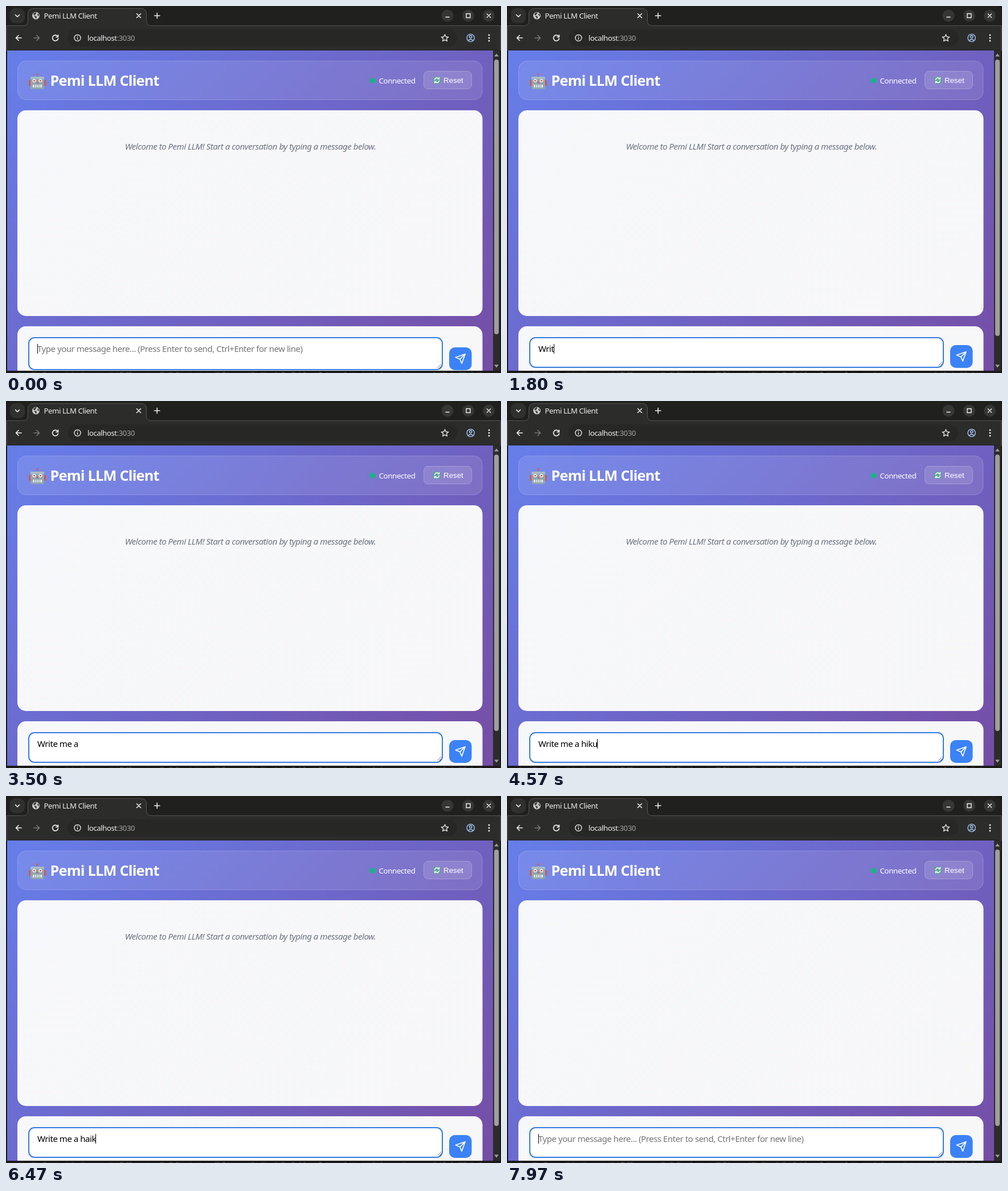
Animation of 869x644 px, one loop 8000 ms. Source, as an HTML page:

```html
<!DOCTYPE html>
<html lang="en">
<head>
<meta charset="utf-8">
<title>Pemi LLM Client</title>
<style>
html, body { margin: 0; width: 100%; height: 100%; overflow: hidden; background: #1b1a19; }
svg { display: block; width: 869px; height: 644px; }
text { font-family: "Noto Sans", "Open Sans", sans-serif; font-size: 15px; letter-spacing: -.031em; white-space: pre; }
.line { fill: none; stroke-linecap: round; stroke-linejoin: round; }
</style>
</head>
<body>
<svg viewBox="0 0 869 644" xmlns="http://www.w3.org/2000/svg">
  <defs>
    <linearGradient id="bg" gradientUnits="userSpaceOnUse" x1="59" y1="21" x2="797" y2="758">
      <stop offset="0" stop-color="#667eea"/><stop offset="1" stop-color="#764ba2"/>
    </linearGradient>
    <linearGradient id="card" gradientUnits="userSpaceOnUse" x1="59" y1="21" x2="797" y2="758">
      <stop offset="0" stop-color="#f7f8fb"/><stop offset="1" stop-color="#f7f7f8"/>
    </linearGradient>
    <clipPath id="page"><rect x="2" y="77" width="865" height="563"/></clipPath>
  </defs>
  <rect width="869" height="644" fill="#1b1a19"/>
  <g id="specks"></g>

  <!-- tab strip -->
  <path d="M1 78V10Q1 0 11 0H858Q868 0 868 10V78Z" fill="#20201f"/>
  <rect x="7" y="4" width="26" height="26" rx="9" fill="#30302f"/>
  <path class="line" d="M16.500 15.500l3.500 3.500 3.500-3.500" stroke="#eee" stroke-width="1.700"/>
  <path d="M1 34.500H30Q38.500 34.500 38.500 26V14Q38.500 4.500 48 4.500H237Q246.500 4.500 246.500 14V26Q246.500 34.500 255 34.500H868V78H1Z" fill="#2c2c2b" stroke="#555553"/>
  <circle cx="52.500" cy="17" r="6.500" fill="#c9c9c9"/>
  <path d="M48 14q2-3 5-3 1 2-1 3 0 2-3 2zm1 3q4 0 5 2 0 3-2 3-1-3-3-5zm7-4q2 1 2 5-3-1-3-3z" fill="#3a3a39"/>
  <text x="66.500" y="21.500" fill="#eee" style="font-size:13.200px">Pemi LLM Client</text>
  <g class="line" stroke="#eee" stroke-width="1.600">
    <path d="M229.500 13.500l7 7m0-7l-7 7M260.500 17h9.500m-4.750-4.750v9.500"/>
  </g>
  <g fill="#363635"><circle cx="775" cy="17" r="10.500"/><circle cx="811.500" cy="17" r="10.500"/><circle cx="847.500" cy="17" r="10.500"/></g>
  <path d="M771.500 19.500h7M808 13.500h7v7h-7zM844 13.500l7 7m0-7l-7 7" fill="none" stroke="#f2f2f2" stroke-width="1.400"/>

  <!-- toolbar -->
  <rect x="108" y="41" width="684" height="30" rx="15" fill="#272726"/>
  <g class="line" stroke-width="1.700" stroke="#eee">
    <path d="M27 56H17.500m4.500-4.500L17.500 56l4.500 4.500"/>
    <path d="M49 56h9.500m-4.500-4.500l4.500 4.500-4.500 4.500" stroke="#777"/>
    <path d="M90.500 53A5 5 0 1 0 91.500 57M91.500 51v3.500H88"/>
  </g>
  <g fill="none" stroke="#e3e3e3" stroke-width="1.400">
    <circle cx="125.500" cy="56" r="5.500"/><path d="M125.500 55v4m0-6.500v1.500"/>
    <path stroke-linejoin="round" d="M770.500 50l1.800 4 4.400.4-3.300 2.900 1 4.300-3.900-2.300-3.900 2.300 1-4.300-3.300-2.900 4.400-.4z"/>
  </g>
  <text x="143" y="60.500" fill="#f1f1f1" style="font-size:13.100px">localhost<tspan fill="#a5a5a5">:3030</tspan></text>
  <g fill="none" stroke="#a8c7fa" stroke-width="1.400">
    <circle cx="815.700" cy="56" r="6.600"/><circle cx="815.700" cy="54" r="2.200"/><path d="M811.500 60.500q4.200-4 8.400 0"/>
  </g>
  <g fill="#eee"><circle cx="848" cy="51" r="1.500"/><circle cx="848" cy="56" r="1.500"/><circle cx="848" cy="61" r="1.500"/></g>

  <g clip-path="url(#page)">
    <rect x="2" y="78" width="853" height="562" fill="url(#bg)"/>
    <path d="M1 77.500H868" stroke="#222221"/>

    <!-- header -->
    <rect x="20.500" y="96.500" width="815.500" height="68" rx="14.500" fill="#fff" fill-opacity=".1" stroke="#fff" stroke-opacity=".2"/>
    <g>
      <path d="M55 120v5" stroke="#78909c" stroke-width="1.500"/>
      <circle cx="55" cy="120" r="1.700" fill="#e5533c"/>
      <path d="M40.500 130h3v10h-3zm26 0h3v10h-3z" fill="#d9503f"/>
      <path d="M43 126q0-2 2-2h20q2 0 2 2v17q0 3-3 3H46q-3 0-3-3z" fill="#8fa5b0"/>
      <path d="M43 126q0-2 2-2h20q2 0 2 2v2H43z" fill="#a9bbc4"/>
      <circle cx="49.500" cy="131" r="3" fill="#f4f4f4"/><circle cx="60.500" cy="131" r="3" fill="#f4f4f4"/>
      <circle cx="49.500" cy="131" r="1.500" fill="#d9503f"/><circle cx="60.500" cy="131" r="1.500" fill="#d9503f"/>
      <path d="M55 132l2 3.500h-4z" fill="#d9503f"/>
      <rect x="47" y="138" width="16" height="5" rx="1.500" fill="#eceff1"/>
      <path d="M50.500 138v5m3-5v5m3-5v5m3-5v5" stroke="#607d8b"/>
    </g>
    <text x="77.500" y="139.500" fill="#fff" style="font-size:25.300px;font-weight:700">Pemi LLM Client</text>
    <circle cx="643.500" cy="131" r="4.700" fill="#10b981"/>
    <text x="654.500" y="135.500" fill="#fff" style="font-size:13.400px">Connected</text>
    <rect x="733.500" y="114.500" width="84" height="31" rx="7.500" fill="#fff" fill-opacity=".12" stroke="#fff" stroke-opacity=".25"/>
    <rect x="750" y="124" width="13" height="12.500" rx="2" fill="#62a39c"/>
    <path class="line" d="M752.500 129.500q1-3.500 4-3.500 2 0 3.500 1.500m.5-2v2.500h-2.500M760.500 131q-1 3.500-4 3.500-2 0-3.500-1.500m-.5 2v-2.500h2.500" stroke="#fff" stroke-width="1.300"/>
    <text x="768" y="134.500" fill="#fff" style="font-family:'Liberation Sans',sans-serif;font-size:13.330px;letter-spacing:0">Reset</text>

    <!-- conversation -->
    <rect x="20" y="183" width="816.500" height="361" rx="15" fill="url(#card)"/>
    <text id="welcome" x="429" y="251.500" text-anchor="middle" fill="#6b7280" font-style="italic">Welcome to Pemi LLM! Start a conversation by typing a message below.</text>

    <!-- message box -->
    <rect x="20" y="562" width="816.500" height="120" rx="15" fill="url(#card)"/>
    <rect id="box" x="40" y="582" width="726" rx="10" fill="#fff" stroke="#367cdf" stroke-width="2"/>
    <path id="grip" d="M757.500 635l6.500-6.500m-3 6.500l3-3" stroke="#666" fill="none"/>
    <text id="hint" x="55" y="607" fill="#757575">Type your message here... (Press Enter to send, Ctrl+Enter for new line)</text>
    <text id="typed" x="55" y="607" fill="#000"></text>
    <rect id="caret" y="593" width="1" height="17" fill="#000"/>
    <g id="send">
      <rect x="778" y="599" width="39.500" height="40" rx="10" fill="#3b82f6"/>
      <path class="line" transform="translate(787.700 609) scale(.833)" d="M22 2L11 13M22 2l-7 20-4-9-9-4z" stroke="#fff" stroke-width="2"/>
    </g>

    <!-- scrollbar -->
    <rect x="855" y="78" width="12" height="562" fill="#2c2c2c"/>
    <path d="M857 88.500l4-5 4 5zM857 629.500l4 5 4-5z" fill="#9f9f9f"/>
    <rect id="thumb" x="857" y="94" width="8" rx="4" fill="#9f9f9f"/>
  </g>
</svg>
<script>
const LOOP = 8000;
const $ = id => document.getElementById(id);

// [time, message, caret visible]
const steps = [
  [0, "", 1], [270, "", 0], [670, "W", 1], [1030, "Wr", 1], [1300, "Wri", 1],
  [1800, "Writ", 1], [1870, "Write", 1], [2030, "Write ", 1],
  [2270, "Write m", 1], [2350, "Write me", 1], [2430, "Write me ", 1],
  [2800, "Write me a", 1], [2900, "Write me a ", 1], [3500, "Write me a ", 0],
  [3670, "Write me a h", 1], [3970, "Write me a hi", 1], [4300, "Write me a hik", 1],
  [4570, "Write me a hiku", 1], [5170, "Write me a hiku", 0],
  [5400, "Write me a hik", 0], [5530, "Write me a hi", 0],
  [5670, "Write me a h", 1], [5800, "Write me a ha", 1], [5970, "Write me a hai", 1],
  [6470, "Write me a haik", 1], [6670, "Write me a haikiu", 1], [7130, "Write me a haiki", 1],
  [7270, "Write me a haik", 1], [7430, "Write me a haiku", 1], [7970, "", 1]
];

function set(id, attrs) {
  for (const k in attrs) $(id).setAttribute(k, attrs[k]);
}

function addSpecks() {
  let seed = 7, out = "";
  const rnd = () => (seed = seed * 16807 % 2147483647) / 2147483647;
  for (let i = 0; i < 90; i++) {
    const x = rnd() * 869, w = 1 + rnd() * 5, g = 15 + rnd() * 45 | 0;
    out += `<rect x="${x.toFixed(1)}" y="642" width="${w.toFixed(1)}" height="2" fill="rgb(${g},${g},${g - 4})"/>`;
  }
  $("specks").innerHTML = out;
}

let shown = null;
function draw(t) {
  const step = steps.findLast(s => s[0] <= t);
  if (step === shown) return;
  shown = step;
  const [at, msg, on] = step;
  const lift = at >= 670 ? 4 : 0;
  $("typed").textContent = msg;
  set("hint", { visibility: msg ? "hidden" : "visible" });
  set("welcome", { visibility: at >= 7970 ? "hidden" : "visible" });
  const end = msg ? $("typed").getComputedTextLength() : 0;
  set("caret", { x: Math.round(55 + end - (msg ? .5 : 0)), visibility: on ? "visible" : "hidden" });
  set("box", { height: 56 - lift });
  set("grip", { transform: `translate(0 ${-lift})` });
  set("send", { transform: `translate(0 ${-lift})` });
  set("thumb", { height: lift ? 485 : 482 });
}

addSpecks();
const start = performance.now();
function tick() {
  draw((performance.now() - start) % LOOP);
  requestAnimationFrame(tick);
}
tick();
</script>
</body>
</html>
```
